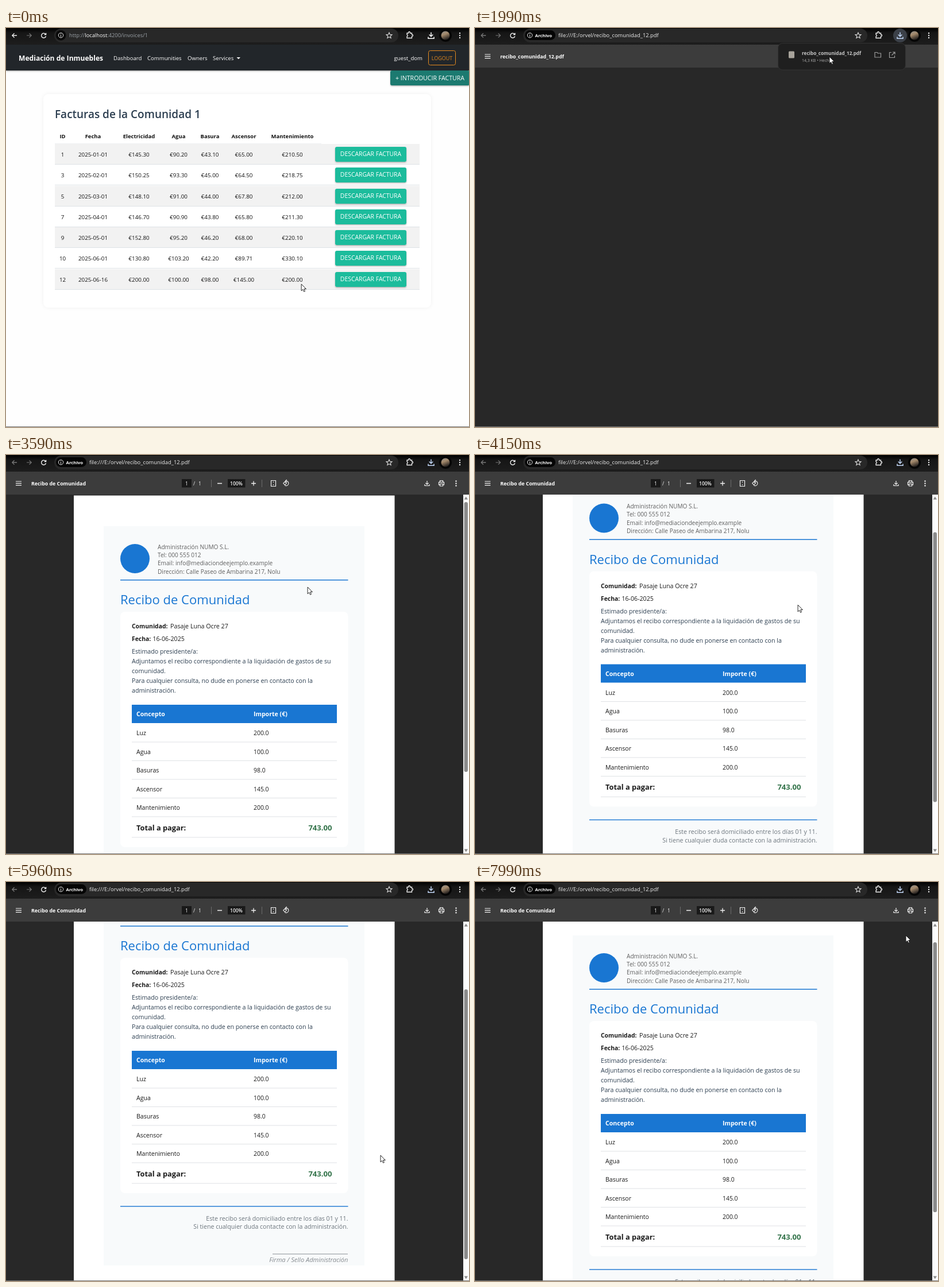
An HTML page for the animation above (8.06 s loop, 806 px wide and 695 px high).

```html
<!DOCTYPE html>
<html lang="es">
<head>
<meta charset="utf-8">
<title>Recibo de comunidad</title>
<style>
html, body { margin: 0; width: 100%; height: 100%; overflow: hidden; background: #fefefe; }
svg { display: block; width: 100vw; height: 100vh; font-family: "Open Sans", "Noto Sans", sans-serif; }
</style>
</head>
<body>
<svg id="stage" viewBox="0 0 806 695"></svg>
<script>
const LOOP = 8060;
const BLUE = '#1976d2';

// y is the middle of the capitals
const text = (x, y, size, str, fill = '#111', extra = '') =>
  `<text x="${x}" y="${(y + size * 0.36).toFixed(2)}" font-size="${size}" fill="${fill}" ${extra}>${str}</text>`;
const rect = (x, y, w, h, fill, extra = '') =>
  `<rect x="${x}" y="${y}" width="${w}" height="${h}" fill="${fill}" ${extra}/>`;
const circle = (x, y, r, fill, extra = '') =>
  `<circle cx="${x}" cy="${y}" r="${r}" fill="${fill}" ${extra}/>`;
const line = (d, color, width = 1.2, extra = '') =>
  `<path d="${d}" fill="none" stroke="${color}" stroke-width="${width}" ${extra}/>`;
const group = (id, body, extra = '') => `<g id="${id}" ${extra}>${body}</g>`;
const dots = (x, y, fill) => [-4, 0, 4].map(d => circle(x, y + d, 1.2, fill)).join('');
const MID = 'text-anchor="middle"';
const END = 'text-anchor="end"';
const BOLD = 'font-weight="700"';
const SEMI = 'font-weight="600"';

const icons = {
  back: 'M19 13H11M14.5 9.3L10.8 13L14.5 16.7',
  forward: 'M36 13H44M40.5 9.3L44.2 13L40.5 16.7',
  reload: 'M69 11A4 4 0 1 0 69.5 14.2M69.6 8.8V11.6H66.8',
  star: 'M667 8L668.4 11.3L672 11.6L669.3 14L670.1 17.5L667 15.6L663.9 17.5L664.7 14L662 11.6L665.6 11.3Z',
  puzzle: 'M698 9H700.5V8A1.5 1.5 0 0 1 703.5 8V9H706.5V11.5H707A1.5 1.5 0 0 1 707 14.5H706.5V17.5H698V14.8A1.7 1.7 0 0 0 698 11.5Z',
  download: 'M740 7.5V14.5M736.7 11.5L740 14.8L743.3 11.5M735 15.5V18.3H745V15.5'
};

function browserBar() {
  return rect(0, 0, 806, 29, 'url(#bar)') + rect(84, 1, 599, 24, '#282828', 'rx="12"') +
    line(icons.forward, '#777') + line(icons.reload, '#eee', 1.4) +
    line(icons.star, '#ddd', 1.1) + line(icons.puzzle, '#eee', 1.3) +
    circle(740, 13, 12, '#3b4048', 'id="halo"') +
    line(icons.download, '#fff', 1.5, 'id="save"') + line(icons.back, '#eee', 1.3, 'id="back"') +
    circle(765, 13, 11, '#050505') + circle(765, 13, 7.5, 'url(#photo)') + dots(790, 13, '#eee');
}

const info = line('M95.5 12.2V15.2M95.5 9.9V11', '#eee', 1.1) +
  circle(95.5, 12.7, 4.2, 'none', 'stroke="#eee" stroke-width="1"');

function invoiceButton(x, y, w, label, fill, size = 10.4) {
  return rect(x, y, w, 26, fill, 'rx="3" filter="url(#lift)"') +
    text(x + w / 2, y + 12.7, size, label, '#fff', MID);
}

function invoicePage() {
  const cols = [98.5, 151.5, 231.5, 300.5, 355, 414, 498.5];
  const heads = 'ID Fecha Electricidad Agua Basura Ascensor Mantenimiento'.split(' ');
  const rows = [
    '1 2025-01-01 145.30 90.20 43.10 65.00 210.50',
    '3 2025-02-01 150.25 93.30 45.00 64.50 218.75',
    '5 2025-03-01 148.10 91.00 44.00 67.80 212.00',
    '7 2025-04-01 146.70 90.90 43.80 65.80 211.30',
    '9 2025-05-01 152.80 95.20 46.20 68.00 220.10',
    '10 2025-06-01 130.80 103.20 42.20 89.71 330.10',
    '12 2025-06-16 200.00 100.00 98.00 145.00 200.00'
  ];
  let s = rect(0, 29, 806, 666, '#fefefe') + rect(0, 29, 806, 45, '#212529', 'filter="url(#lift)"');
  s += text(22, 52.5, 12.1, 'Mediación de Inmuebles', '#fff', BOLD);
  [[187, 'Dashboard'], [246, 'Communities'], [316, 'Owners'], [360, 'Services']]
    .forEach(([x, label]) => s += text(x, 52.5, 9.6, label, '#fff'));
  s += '<path d="M401.5 51H408L404.75 54.3Z" fill="#fff"/>';
  s += text(725, 52.5, 9.6, 'guest_dom', '#fff', END);
  s += rect(735.5, 39.5, 47, 25, 'none', 'rx="3" stroke="#e58a1f"') + text(759, 52.5, 9, 'LOGOUT', '#e58a1f', MID);
  s += invoiceButton(669, 74, 138, '+ INTRODUCIR FACTURA', '#1f7a70', 10.6);
  s += rect(65, 115, 675, 372, '#fff', 'rx="9" filter="url(#soft)"');
  s += text(85, 150, 19, 'Facturas de la Comunidad 1', '#2c3e50', SEMI);
  heads.forEach((h, i) => s += text(cols[i], 188.5, 9.5, h, '#111', MID + ' ' + BOLD));
  s += rect(85, 201.5, 464, 1, '#dee2e6');
  rows.forEach((row, r) => {
    const y = Math.round(202 + r * 36.25);
    if (r % 2 === 0) s += rect(85, y, 635, 36, '#f2f2f2');
    s += rect(85, y + 35, 635, 1, '#dee2e6');
    row.split(' ').forEach((v, c) => s += text(cols[c], y + 18, 9.8, (c > 1 ? '€' : '') + v, '#111', MID));
    s += invoiceButton(573, y + 5, 124, 'DESCARGAR FACTURA', '#1abc9c');
  });
  s += circle(95.5, 12.7, 9, '#0a0a0a') + info;
  s += text(110, 12.7, 9.3, 'http://<tspan fill="#fff">localhost</tspan>:4200/invoices/1', '#9aa0a6');
  return s;
}

function viewer() {
  let s = rect(0, 29, 806, 666, '#282828') + rect(0, 29, 806, 40, '#3c3c3c');
  s += rect(87, 4, 53, 17, '#050505', 'rx="8.5"') + info;
  s += text(104.5, 12.7, 7.8, 'Archivo', '#fff', BOLD);
  s += text(145, 12.7, 9.35, 'file:///E:/orvel/recibo_comunidad_12.pdf', '#eee');
  s += line('M17 46H27M17 49.3H27M17 52.6H27', '#f1f1f1', 1.2);
  s += text(44, 49.7, 8.8, 'recibo_comunidad_12.pdf', '#fff', BOLD + ' id="heading"');
  return s;
}

function controls() {
  const c = '#f1f1f1';
  return rect(306, 42, 17, 14.5, '#191919') + rect(386, 42, 30.5, 14.5, '#191919') +
    text(314.5, 49.5, 8.7, '1', c, MID) + text(327.5, 49.5, 8.7, '/', c, MID) +
    text(337.5, 49.5, 8.7, '1', c, MID) + text(401, 49.5, 8.5, '100%', c, MID + ' ' + SEMI) +
    line('M357.5 43V56M445.5 43V56', '#6a6a6a', 1) +
    line('M368 49.5H376M427 49.5H435M431 45.5V53.5', c, 1.3) +
    line('M461.5 44.5H469.5V54.5H461.5ZM465.5 46.5V48M465.5 51V52.5', c, 1.2) +
    line('M487 45.3A4.2 4.2 0 1 1 485.5 53M488.8 43L486.3 45.3L488.8 47.6M485.5 46.5L488.3 49.3L485.5 52.1L482.7 49.3Z', c, 1.1) +
    line('M733 45V51M730.3 48.7L733 51.4L735.7 48.7M729 51V53.5H737V51', c, 1.2) +
    line('M755.5 47V44.5H760.5V47M755.5 52H753.5V47.3H762.5V52H760.5M755.5 50.3H760.5V54H755.5Z', c, 1.2) +
    dots(783.5, 49.5, c);
}

function sheet() {
  const grey = '#6c757d', ink = '#1a1a1a', navy = '#2c3e50';
  let s = rect(118, 70.5, 558.5, 789, '#fff') + rect(170, 124, 454, 685, '#f8fafb');
  s += circle(224.5, 180.5, 25.5, BLUE);
  ['Administración NUMO S.L.', 'Tel: 000 555 012', 'Email: info@mediaciondeejemplo.example',
    'Dirección: Calle Paseo de Ambarina 217, Nolu']
    .forEach((row, i) => s += text(264, 160 + i * 14.3, 10.1, row, '#5f5f5f'));
  s += rect(199, 217, 396.5, 1.5, BLUE);
  s += text(199, 252.5, 22, 'Recibo de Comunidad', BLUE);
  s += rect(199, 273, 396.5, 410, '#fff', 'rx="8"');
  s += text(219, 298.3, 10.4, 'Comunidad:', ink, BOLD) + text(286, 298.3, 10.7, 'Pasaje Luna Ocre 27', ink);
  s += text(219, 320.3, 10.4, 'Fecha:', ink, BOLD) + text(255.5, 320.3, 10.6, '16-06-2025', ink);
  ['Estimado presidente/a:',
    'Adjuntamos el recibo correspondiente a la liquidación de gastos de su', 'comunidad.',
    'Para cualquier consulta, no dude en ponerse en contacto con la', 'administración.']
    .forEach((row, i) => s += text(219, 342.6 + i * 17, 10.65, row, navy));
  s += rect(219, 435, 357, 32, BLUE);
  s += text(227, 451.5, 10.6, 'Concepto', '#fff', BOLD) + text(431, 451.5, 10.6, 'Importe (€)', '#fff', BOLD);
  [['Luz', '200.0'], ['Agua', '100.0'], ['Basuras', '98.0'], ['Ascensor', '145.0'], ['Mantenimiento', '200.0']]
    .forEach(([name, sum], i) => {
      const y = 484.5 + i * 32.5;
      s += text(227, y, 10.6, name, ink) + text(431, y, 10.4, sum, ink) + rect(219, y + 15, 357, 1, '#dfe2e5');
    });
  s += text(227, 649, 12.8, 'Total a pagar:', ink, BOLD) + text(567.5, 649, 13.1, '743.00', '#33734a', END + ' ' + BOLD);
  s += rect(219, 665.5, 357, 1, '#dfe2e5') + rect(199, 705.3, 396.5, 1.4, BLUE);
  s += text(595.5, 726.7, 10.6, 'Este recibo será domiciliado entre los días 01 y 11.', grey, END);
  s += text(595.5, 741.6, 10.6, 'Si tiene cualquier duda contacte con la administración.', grey, END);
  s += rect(464, 788.5, 131, 1, '#8a8f94');
  s += text(595.5, 799.3, 11.1, 'Firma / Sello Administración', '#868b90', END + ' font-style="italic"');
  return s;
}

function scrollbar() {
  return rect(796, 69, 10, 626, '#fcfcfc') +
    '<path d="M797.5 77.5L800.8 72.5L804 77.5ZM797.5 686.5L800.8 691.5L804 686.5Z" fill="#8b8b8b"/>' +
    rect(797.5, 82, 6.5, 470, '#8b8b8b', 'rx="3.2" id="thumb"');
}

function popup() {
  const c = '#9c9c9c';
  return rect(527.5, 26.5, 222, 46.5, '#1f1f1f', 'rx="8" stroke="#343434"') +
    rect(546, 40.5, 10, 12, '#a8a39b', 'rx="1.5"') +
    group('entry',
      text(569, 44.3, 8.2, 'recibo_comunidad_12.pdf', '#e3e3e3', BOLD) +
      text(569, 56.5, 7, '14,3 KB • Hecho', '#c4c4c4')) +
    line('M696 42.5H700L701.3 44H706.5V51H696Z', c, 1.2) +
    line('M725 42.5H721.5V51.5H730.5V48M727 42H731V46M731 42L725.5 47.5', c, 1.2);
}

const defs = `<defs>
  <linearGradient id="bar" x2="0" y2="1"><stop offset="0" stop-color="#000"/><stop offset=".3" stop-color="#161616"/><stop offset="1" stop-color="#1d1d1d"/></linearGradient>
  <linearGradient id="photo" x2=".4" y2="1"><stop offset="0" stop-color="#8d8d8a"/><stop offset=".45" stop-color="#a58a6c"/><stop offset="1" stop-color="#2e2824"/></linearGradient>
  <filter id="lift" x="-10%" y="-20%" width="120%" height="160%"><feDropShadow dx="0" dy="1.3" stdDeviation="1" flood-opacity=".3"/></filter>
  <filter id="soft" x="-5%" y="-5%" width="110%" height="110%"><feDropShadow dx="0" dy="0" stdDeviation="3" flood-opacity=".06"/></filter>
  <clipPath id="view">${rect(0, 69, 796, 626, '#000')}</clipPath></defs>`;

const pointer =
  group('arrow', '<path d="M0 0V11.8L2.7 9.3L4.5 13.3L6.4 12.4L4.7 8.5H8.3Z" fill="#fff" stroke="#111" stroke-width=".9"/>') +
  group('hand', '<path d="M-1.2 1Q0 -1 1.2 1V5L6.5 6.3Q7.5 7 7 9L6 14H-.5L-4 9.5Q-4.5 7.5 -1.2 9Z" fill="#fff" stroke="#111" stroke-width=".9"/>');

document.getElementById('stage').innerHTML = defs + browserBar() +
  group('invoices', invoicePage()) +
  group('viewer', viewer() +
    group('loaded', controls() + group('clip', group('sheet', sheet()), 'clip-path="url(#view)"') + scrollbar())) +
  rect(0, 694, 806, 1, '#777') + group('popup', popup()) + group('cursor', pointer);

const $ = id => document.getElementById(id);
const show = (id, on) => $(id).setAttribute('display', on ? 'inline' : 'none');
const move = (id, x, y) => $(id).setAttribute('transform', `translate(${x} ${y})`);
const clamp = v => Math.max(0, Math.min(1, v));
const smooth = v => v * v * (3 - 2 * v);

// keys: [time, value, ...]
function track(keys, t, ease = v => v) {
  if (t <= keys[0][0]) return keys[0].slice(1);
  const i = keys.findIndex(k => k[0] > t);
  if (i < 0) return keys[keys.length - 1].slice(1);
  const a = keys[i - 1], b = keys[i];
  const p = ease((t - a[0]) / (b[0] - a[0]));
  return a.slice(1).map((v, j) => v + (b[j + 1] - v) * p);
}

const path = [
  [0, 514, 446], [300, 560, 452], [520, 603, 440], [900, 606, 440], [1150, 640, 300],
  [1450, 638, 115], [1640, 618, 52], [1780, 617, 50], [2480, 617, 50], [2680, 732, 24],
  [2880, 420, 165], [3030, 260, 190], [3180, 330, 306], [3380, 490, 250], [3590, 525, 230],
  [4150, 562, 261], [4990, 634, 364], [5600, 652, 476], [7370, 652, 476], [7850, 742, 95],
  [7989, 742, 95], [7990, 750, 93]
];
const scroll = [
  [3700, 0], [4150, 70.5], [5600, 70.5], [5960, 141], [6760, 141], [6970, 172],
  [7369, 172], [7370, 165], [7600, 101.5], [7850, 31]
];

function draw(t) {
  const pdf = t >= 1780, ready = t >= 2200;
  show('invoices', !pdf);
  show('viewer', pdf);
  show('loaded', ready);
  $('heading').textContent = ready ? 'Recibo de Comunidad' : 'recibo_comunidad_12.pdf';
  $('back').setAttribute('stroke', pdf ? '#777' : '#eee');
  $('save').setAttribute('stroke', t >= 760 ? '#c2d7f8' : '#fff');

  const open = clamp((t - 930) / 140) * clamp((2200 - t) / 140);
  show('popup', open > 0);
  show('halo', open > 0);
  $('popup').setAttribute('opacity', open);
  $('entry').setAttribute('opacity', pdf ? 0.85 : 1);

  const [s] = track(scroll, t, smooth);
  move('sheet', 0, -s);
  move('thumb', 0, s * 0.745);

  const [x, y] = track(path, t);
  move('cursor', x, y);
  const over = t > 380 && t < 960;
  show('hand', over);
  show('arrow', !over);
}

function tick() {
  draw(performance.now() % LOOP);
  requestAnimationFrame(tick);
}
tick();
</script>
</body>
</html>
```
